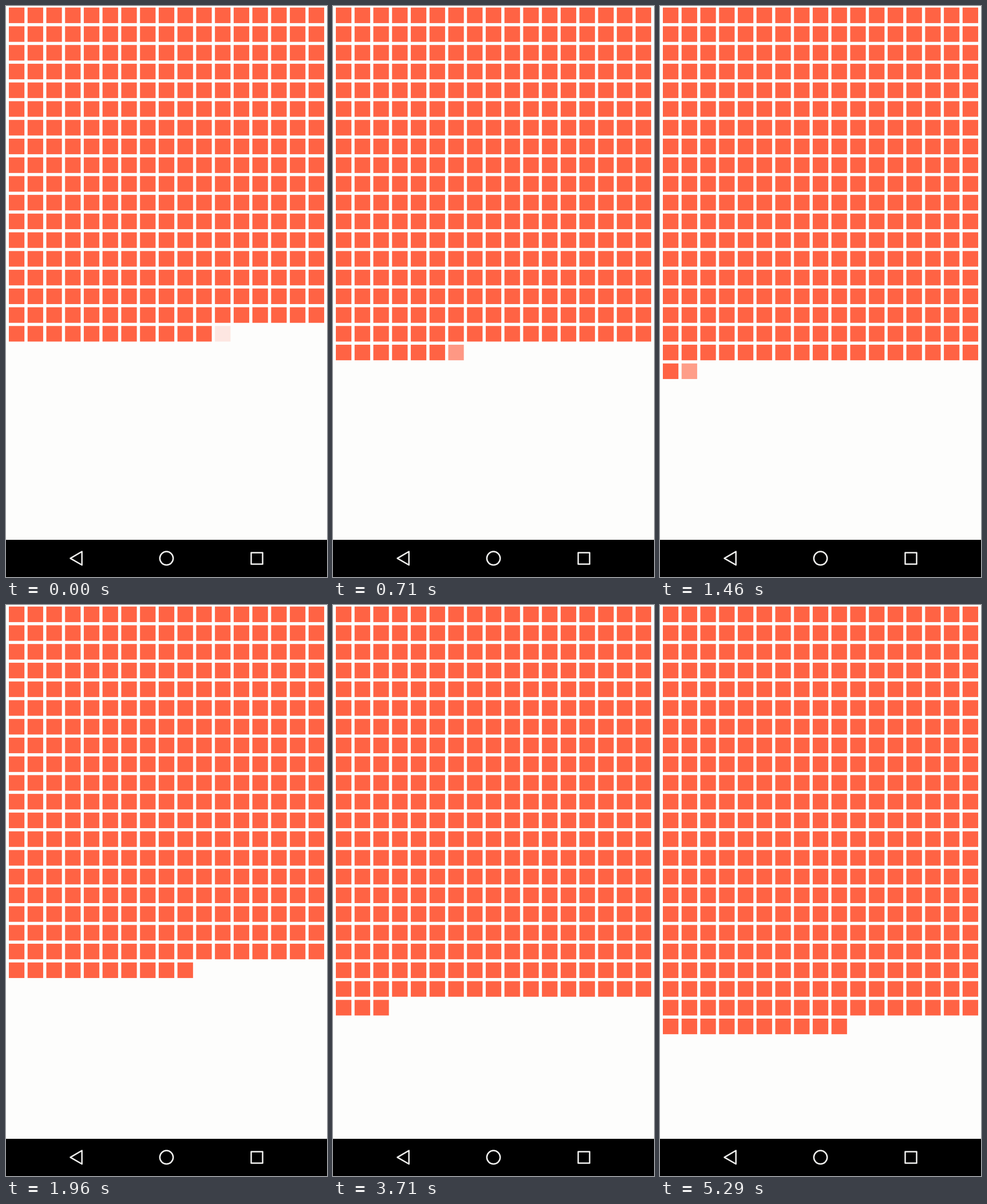
Recreate the animation shown at these times as an HTML page with a canvas. Size 561 by 998 pixels, loop 5.33 s.

```html
<!DOCTYPE html>
<html lang="en">
<head>
<meta charset="utf-8">
<title>Filling grid</title>
<style>
  html, body { margin: 0; width: 100%; height: 100%; overflow: hidden; background: #fdfdfc; }
  canvas { display: block; }
</style>
</head>
<body>
<canvas id="stage" width="561" height="998"></canvas>
<script>
const ctx = document.getElementById('stage').getContext('2d');
const LOOP = 5330, STEPS = 128, COLS = 17, PITCH = 32.74, SIZE = 27.2;

// [step, squares filled]; the fraction is the opacity of the newest square
const PACE = [[0, 300.15], [17, 312.65], [26, 318.33], [47, 333], [72, 348.88], [89, 360], [127, 384]];

function filledAt(step) {
  const i = PACE.findIndex(([s]) => s >= step) || 1;
  const [s0, n0] = PACE[i - 1], [s1, n1] = PACE[i];
  return n0 + (n1 - n0) * (step - s0) / (s1 - s0);
}

function drawGrid(filled) {
  ctx.fillStyle = '#ff6344';
  for (let i = 0; i < filled; i++) {
    ctx.globalAlpha = Math.min(1, filled - i);
    ctx.fillRect(5 + PITCH * (i % COLS), 2.7 + PITCH * Math.floor(i / COLS), SIZE, SIZE);
  }
  ctx.globalAlpha = 1;
}

function drawNavBar() {
  ctx.fillStyle = '#000';
  ctx.fillRect(0, 933, 561, 65);
  ctx.strokeStyle = '#f0f0ee';
  ctx.lineWidth = 2.5;
  ctx.lineJoin = 'round';
  ctx.beginPath();
  ctx.moveTo(112.5, 965.3);
  ctx.lineTo(132.7, 953.5);
  ctx.lineTo(132.7, 977);
  ctx.closePath();
  ctx.moveTo(292.2, 965.3);
  ctx.arc(280.5, 965.3, 11.7, 0, 2 * Math.PI);
  ctx.rect(428.5, 955.5, 20, 20);
  ctx.stroke();
}

function draw() {
  const step = Math.floor(performance.now() % LOOP / LOOP * STEPS);
  ctx.fillStyle = '#fdfdfc';
  ctx.fillRect(0, 0, 561, 998);
  drawGrid(filledAt(step));
  drawNavBar();
  requestAnimationFrame(draw);
}
draw();
</script>
</body>
</html>
```
